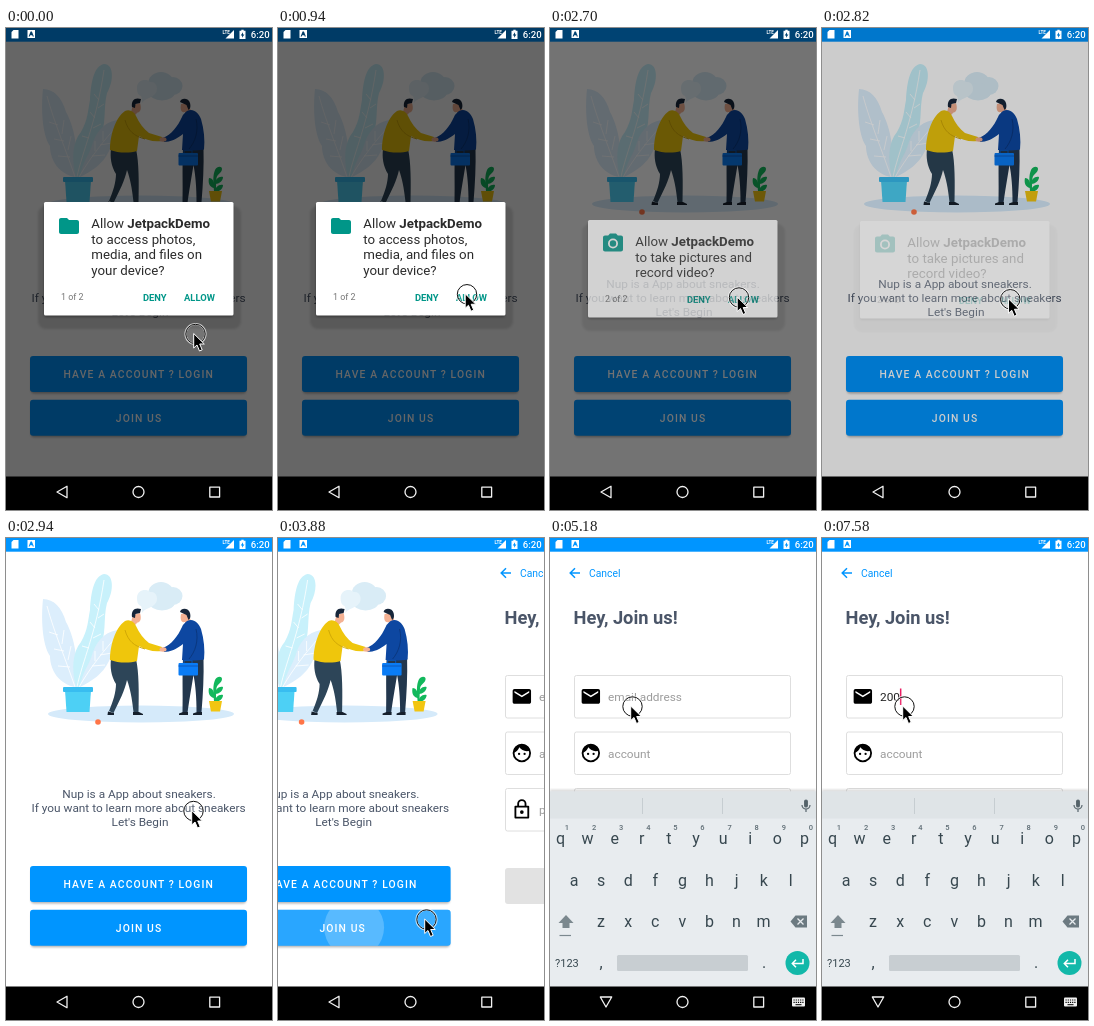
Recreate the animation shown at these times as an HTML page. Size 266 by 482 pixels, loop 8 s.

```html
<!DOCTYPE html>
<html lang="en">
<head>
<meta charset="utf-8">
<title>App sign-up</title>
<style>
  html, body { margin: 0; width: 100%; height: 100%; overflow: hidden; background: #fff; }
  svg { display: block; width: 100vw; height: 100vh; }
  text { font-family: Roboto, sans-serif; white-space: pre; }
  .body { font-size: 11.83px; fill: #4a5568; text-anchor: middle; }
  .btn { font-size: 10.35px; font-weight: 500; letter-spacing: 1.12px; fill: #fff; }
  .msg { font-size: 13.3px; fill: #2b2b2b; }
  .msg .b { font-weight: 700; }
  .act { font-size: 9.4px; font-weight: 600; fill: #009688; }
  .count { font-size: 8.9px; fill: #757575; }
  .hint { font-size: 11.83px; fill: #9c9c9c; }
  .key { font-size: 16px; fill: #37474f; text-anchor: middle; }
  .num { font-size: 7.5px; font-weight: 500; fill: #5f6d75; text-anchor: middle; }
  .field { fill: #fff; stroke: #dedede; }
</style>
</head>
<body>
<svg viewBox="0 0 266 482" preserveAspectRatio="none">
  <defs>
    <filter id="soft" x="-10%" y="-20%" width="120%" height="140%"><feGaussianBlur stdDeviation="1.2"/></filter>
    <clipPath id="joinClip"><rect x="24" y="371.700" width="217" height="36" rx="3"/></clipPath>
  </defs>
  <rect width="266" height="482" fill="#fff"/>

  <g id="welcome">
    <!-- plant -->
    <ellipse cx="135" cy="176" rx="93" ry="8.500" fill="#d5eafa"/>
    <path d="M69 149C53 146 44 132 44 118C36 106 35 80 37 61C48 61 56 70 60 84C69 100 73 126 70 149Z" fill="#dceefc"/>
    <path d="M70 149C65 130 67 113 75 104C82 92 82 82 84 72C85 54 88 38 98 36C108 36 108 53 101 65C97 80 101 98 93 112C89 130 80 142 73 149Z" fill="#c8f1fb"/>
    <path d="M74 149C76 134 84 126 87 114C92 100 102 92 115 92C121 104 107 114 103 123C97 136 86 143 74 149Z" fill="#dceefc"/>
    <g fill="none" stroke="#fff" stroke-width=".8">
      <path d="M69 149C60 122 48 94 41 68M71 149C76 124 90 96 98 42M73 149C84 130 98 112 112 97"/>
      <path d="M52 97l-9-3M58 113l-10-2M64 129l-12-1M56 106l2-14M62 122l3-14M83 110l-7-2M89 90l-5-6M93 72l-5-6M87 100l8-4M92 80l6-4M89 123l0-10M97 113l0-10M86 128l13-1M94 117l12-2"/>
    </g>
    <path d="M59 152H85L83.500 174H60.500Z" fill="#4dd0f5"/>
    <rect x="57" y="149" width="30" height="5" rx="1" fill="#38bdf0"/>
    <!-- speech bubbles -->
    <g fill="#d9ecf6">
      <ellipse cx="155" cy="56" rx="13" ry="12"/>
      <ellipse cx="167" cy="58" rx="9.500" ry="9"/>
      <ellipse cx="156" cy="64" rx="13" ry="8.500"/>
    </g>
    <path d="M131 60C131 52 140 50 144 54C151 53 153 62 149 66C146 70 139 70 136 75C136 72 136 70 135 68C132 67 131 64 131 60Z" fill="#e6f3fa"/>
    <!-- left man -->
    <path d="M105 121H130C133 134 133 155 132.500 174H127.500C126 160 124 150 121 142C119 152 113 164 107.500 175L103 173C107 164 110 154 110 146C105 138 104 129 105 121Z" fill="#2d4558"/>
    <path d="M102 173.500l6 1.500v2h-6.500zM127 174h6l4 2v1h-10z" fill="#16202c"/>
    <path d="M127 77L134 75C135.500 80 135 84 131.500 84.500L129 87L125 84Z" fill="#f4b193"/>
    <path d="M126 79C125 72 129 69 135 71L134 75L129.500 76L129 80Z" fill="#17263a"/>
    <path d="M119 83C123 81 128 83 130 88C133 95 138 101 143 105L156 109L155.500 113C147 114 140 112 133 108L131 123C123 125.500 112 125 104 122C104 108 109 90 119 83Z" fill="#efc60c"/>
    <path d="M119 92C122 103 128 108 139 111" fill="none" stroke="#cda506" stroke-width=".9"/>
    <!-- right man -->
    <path d="M177 120H197.500C198 138 197 156 195.500 174H190.500C190.500 160 189.500 147 187.500 137C185 152 183 164 181.500 175H176.500C177 155 176 137 177 120Z" fill="#23374d"/>
    <path d="M173 175.500l4-1.500h5v3h-9zM187 175.500l4-1.500h5v3h-9z" fill="#16202c"/>
    <path d="M175 76L182 75L185 83L180 87L179 84C175 85 174 81 175 76Z" fill="#f4b193"/>
    <path d="M174 74C175 69 183 70 184 75C185 79 184 81 182.500 82L180.500 77Z" fill="#17263a"/>
    <path d="M181 83C187 80 192 84 195 91C198 101 199 112 198 121.500C190 123 182 122.500 176 122L177 106C171 111 164 114 158 114L157 110C165 107 172 98 176 89C177 86 179 85 181 83Z" fill="#0d47a1"/>
    <path d="M190 91C193 103 189 114 183 121" fill="none" stroke="#0a377f"/>
    <ellipse cx="157" cy="111.500" rx="3.500" ry="2.200" fill="#f4b193"/>
    <path d="M178 125v-2.500h8v2.500" fill="none" stroke="#0a4fa8" stroke-width="1.200"/>
    <rect x="172.500" y="125" width="19.500" height="12.500" rx="1" fill="#0a7cf5"/>
    <path d="M172.500 128h19.500" stroke="#0d57b8"/>
    <!-- small plant -->
    <g fill="#12b85c">
      <path d="M208 163C207 152 207 147 209 142C211 138 216 138 216 141C216 145 211 146 210.500 150C210 155 210 159 210 163Z"/>
      <path d="M208 160C203 159 202 154 203 150C207 150 209 155 208.500 160ZM209.500 156C209 151 213 148 217 149C217 153 213 156 209.500 156ZM209 164C209 159 213 156 217 157C217 161 213 164 209 164Z"/>
    </g>
    <path d="M203 163H216L214 173.500H205Z" fill="#f2c512"/>
    <circle cx="92" cy="184" r="2.800" fill="#ff7547"/>

    <text class="body" x="133" y="259.500">Nup is a App about sneakers.</text>
    <text class="body" x="132.600" y="273.500">If you want to learn more about sneakers</text>
    <text class="body" x="134" y="287.500">Let's Begin</text>
    <g fill="#000" opacity=".3" filter="url(#soft)">
      <rect x="25" y="331" width="215" height="34.500" rx="3"/>
      <rect x="25" y="374.700" width="215" height="34.500" rx="3"/>
    </g>
    <g fill="#0095ff">
      <rect x="24" y="328" width="217" height="36" rx="3"/>
      <rect x="24" y="371.700" width="217" height="36" rx="3"/>
    </g>
    <g id="ripple" fill="#fff" clip-path="url(#joinClip)">
      <rect x="24" y="371" width="217" height="37" opacity=".16"/>
      <circle cx="144.500" cy="389.500" r="30" opacity=".22"/>
    </g>
    <text class="btn" x="57.500" y="350.200">HAVE A ACCOUNT ? LOGIN</text>
    <text class="btn" x="109.800" y="393.700">JOIN US</text>
  </g>

  <g id="join">
    <rect y="14" width="266" height="435" fill="#fff"/>
    <path d="M30 35H20.500M25 30.200L20.200 35L25 39.800" fill="none" stroke="#0095ff" stroke-width="1.500"/>
    <text x="39" y="38.700" font-size="10.35" fill="#0095ff">Cancel</text>
    <text x="23.500" y="85.500" font-size="18.3" font-weight="700" fill="#4a5568">Hey, Join us!</text>
    <rect class="field" x="24.500" y="137.500" width="216" height="42.500" rx="2"/>
    <rect class="field" x="24.500" y="194" width="216" height="42.500" rx="2"/>
    <rect class="field" x="24.500" y="250.500" width="216" height="42.500" rx="2"/>
    <path transform="translate(29.800 147.400) scale(.92)" d="M20 4H4c-1.100 0-2 .9-2 2v12c0 1.100.9 2 2 2h16c1.100 0 2-.9 2-2V6c0-1.100-.9-2-2-2zm0 4l-8 5-8-5V6l8 5 8-5v2z"/>
    <g transform="translate(29.800 204) scale(.92)">
      <circle cx="12" cy="12" r="9" fill="none" stroke="#000" stroke-width="2"/>
      <path d="M3 12C6 11 8.300 8.600 9.300 5.800C11 8.300 14 10 17.400 10L20.500 9.500C20 5 16 2.500 12 2.500S3 6 3 12Z"/>
      <circle cx="9" cy="13" r="1.250"/><circle cx="15" cy="13" r="1.250"/>
    </g>
    <g transform="translate(29.800 260.300) scale(.92)">
      <path d="M5 9H19V21H5ZM8 9V6a4 4 0 0 1 8 0V9" fill="none" stroke="#000" stroke-width="2" stroke-linejoin="round"/>
      <circle cx="12" cy="15" r="2"/>
    </g>
    <text class="hint" id="hint" x="58" y="163">email address</text>
    <text class="hint" x="58" y="219.600">account</text>
    <text class="hint" x="58" y="276.200">password</text>
    <text id="typed" x="58" y="163" font-size="11.83" fill="#222"></text>
    <rect id="caret" y="150.500" width="1.500" height="16.500" fill="#e91e63"/>
    <rect x="24" y="330" width="217" height="36" rx="3" fill="#e2e2e2"/>
  </g>

  <g id="keyboard">
    <rect y="251.500" width="266" height="4" fill="#000" opacity=".14" filter="url(#soft)"/>
    <rect y="253.500" width="266" height="196" fill="#e8ecef"/>
    <rect y="253.500" width="266" height="27" fill="#dfe4e7"/>
    <path d="M92.500 260V276M172.500 260V276" stroke="#c6cdd1"/>
    <g fill="none" stroke="#55636a" stroke-width="1.200">
      <path d="M252 267a4 4 0 0 0 8 0M256 271v3"/>
      <rect x="254.700" y="262" width="2.600" height="7" rx="1.300" fill="#55636a"/>
    </g>
    <g id="keys"></g>
    <path d="M16 377L23.500 385H19.500V390H12.500V385H8.500Z" fill="#7b888e"/>
    <path d="M9.500 397.500H21" stroke="#7b888e" stroke-width="1.200"/>
    <path d="M245.500 377.500H257V389.500H245.500L240.500 383.500Z" fill="#6c7a81"/>
    <path d="M247.500 380.500l6 6m0-6l-6 6" stroke="#e8ecef" stroke-width="1.300"/>
    <text x="5" y="428.700" font-size="11" fill="#37474f">?123</text>
    <rect x="67" y="417" width="131" height="16" rx="1.500" fill="#c8ced2"/>
    <circle cx="247.500" cy="425" r="12" fill="#12b8a9"/>
    <path d="M253 421V425.500H242.500M246 421.800L242.300 425.500L246 429.200" fill="none" stroke="#fff" stroke-width="1.500"/>
  </g>

  <rect width="266" height="13.700" fill="#0095ff"/>
  <rect id="scrim" width="266" height="449"/>

  <g id="dialog">
    <rect id="shade" x="32" width="203" rx="8" opacity=".12" filter="url(#soft)"/>
    <rect id="shade2" x="38" width="189" rx="2" opacity=".35" filter="url(#soft)"/>
    <rect id="card" x="38" width="189.500" rx="1.500" fill="#fff"/>
    <rect id="press" x="173" y="257" width="41" height="24" rx="1.500" fill="#e6e6e6"/>
    <g id="ask1">
      <path transform="translate(51 186)" fill="#009688" d="M10 4H4c-1.100 0-2 .9-2 2v12c0 1.100.9 2 2 2h16c1.100 0 2-.9 2-2V8c0-1.100-.9-2-2-2h-8l-2-2z"/>
      <text class="msg" x="85.300" y="200">Allow <tspan class="b">JetpackDemo</tspan></text>
      <text class="msg" x="85.300" y="215.600">to access photos,</text>
      <text class="msg" x="85.300" y="231.200">media, and files on</text>
      <text class="msg" x="85.300" y="246.800">your device?</text>
    </g>
    <g id="ask2">
      <path transform="translate(51 201.500)" fill="#009688" fill-rule="evenodd" d="M9 2L7.200 4H4c-1.100 0-2 .9-2 2v12c0 1.100.9 2 2 2h16c1.100 0 2-.9 2-2V6c0-1.100-.9-2-2-2h-3.200L15 2H9zM12 7a5 5 0 1 1 0 10a5 5 0 1 1 0-10zM12 8.800a3.200 3.200 0 1 0 0 6.400a3.200 3.200 0 1 0 0-6.400z"/>
      <text class="msg" x="85.300" y="216">Allow <tspan class="b">JetpackDemo</tspan></text>
      <text class="msg" x="85.300" y="231.700">to take pictures and</text>
      <text class="msg" x="85.300" y="247.400">record video?</text>
    </g>
    <text class="count" id="count" x="55" y="272.300"></text>
    <text class="act" x="137" y="272.500">DENY</text>
    <text class="act" x="178" y="272.500">ALLOW</text>
  </g>

  <!-- status bar icons -->
  <g fill="#fff">
    <path d="M7.500 2H12.500V10.500H5.500V4Z"/>
    <path fill-rule="evenodd" d="M21.500 2h7.500v8h-7.500zM24.600 3.500h1.300l2 5h-1.200l-.4-1.200h-2.100l-.4 1.200h-1.200z"/>
    <text x="216.500" y="5.800" font-size="4.6" font-weight="700">LTE</text>
    <path d="M219.500 10.500H228V2Z"/>
    <path fill-rule="evenodd" d="M233.500 2.800h1.800V1.800h2.400v1h1.800V11h-6zM237 4.200l-2.300 3.200h1.400V9.800l2.300-3.400H237z"/>
    <text x="244.800" y="9.800" font-size="9.6" font-weight="500">6:20</text>
  </g>

  <!-- navigation bar -->
  <rect y="448.500" width="266" height="33.500"/>
  <g fill="none" stroke="#f2f2f2" stroke-width="1.300" stroke-linejoin="round">
    <path id="back" d="M51 464L61 458.300V469.700Z"/>
    <circle cx="132.500" cy="464" r="5.500"/>
    <rect x="203.800" y="459.200" width="9.800" height="9.800"/>
  </g>
  <g id="ime">
    <rect x="242" y="459.500" width="13" height="9" rx="1" fill="#f2f2f2"/>
    <path d="M243.500 462H253.500M243.500 464.300H253.500" stroke="#000" stroke-width="1.200" stroke-dasharray="1.200 1"/>
    <path d="M245.500 466.700H251.500" stroke="#000"/>
  </g>

  <g id="pointer">
    <circle r="10" fill="#fff" fill-opacity=".1" stroke="#fff" stroke-width="2.200" stroke-opacity=".7"/>
    <circle r="9.700" fill="none" stroke="#111"/>
    <path d="M-1.800 -.5V14L1.500 11L4 17L6.700 15.800L4.200 10H8.800Z" stroke="#fff"/>
  </g>
</svg>
<script>
const $ = id => document.getElementById(id);
const set = (id, attrs) => {
  for (const name in attrs) $(id).setAttribute(name, attrs[name]);
};
const show = (id, on) => { $(id).style.display = on ? '' : 'none'; };
const shift = (id, x, y) => set(id, { transform: `translate(${x} ${y})` });

const row = (chars, x, y, cls = 'key') => [...chars].map((c, i) =>
  `<text class="${cls}" x="${x + i * 27.1}" y="${y}">${c}</text>`).join('');
$('keys').innerHTML = row('qwertyuiop', 10.5, 305.5) + row('1234567890', 17, 292, 'num') +
  row('asdfghjkl', 24, 347.5) + row('zxcvbnm', 51, 388.5) +
  row(',', 51, 430) + row('.', 214, 430);

// Tables of [tick, ...values]; values run linearly between rows.
const pointer = [[0, 189.5, 306], [5, 189.5, 272.5], [7, 189.5, 272.5], [9, 188.5, 260],
  [17, 188.5, 260], [19, 189, 269.5], [23, 189, 269.5], [25, 187.5, 273], [29, 149.5, 377],
  [30, 148.5, 381.5], [34, 148.5, 381.5], [38, 82.5, 168.5]];
const slide = [[32, 0, 272], [33, -68.4, 203], [34, -150, 119], [35, -215, 52], [36, -252, 14], [37, -266, 0]];
const rise = [[39, 196], [40, 120], [41, 36], [42, 0]];
const cardTop = [[12, 174], [13, 182], [14, 190]];
const fade = [[22, 1, .6, 0], [23, .68, .55, 2], [24, .2, .2, 3], [25, 0, 0, 3]];
const askIn = [[15, 0], [16, .3], [17, .75], [18, 1]];
const pressed = [[11, 0], [12, .6], [13, 1], [15, 1], [18, 0]];
// Hard changes: [tick, typed text, caret visible]
const typing = [[0, '', 0], [40, '', 1], [44, '', 0], [49, '', 1], [53, '2', 1], [57, '2', 0],
  [61, '2', 1], [62, '20', 1], [64, '200', 1]];

function at(table, k) {
  const i = table.findIndex(r => r[0] > k);
  if (i === 0) return table[0].slice(1);
  if (i < 0) return table[table.length - 1].slice(1);
  const a = table[i - 1], b = table[i], p = (k - a[0]) / (b[0] - a[0]);
  return a.slice(1).map((v, j) => v + (b[j + 1] - v) * p);
}

const tick = t => t < 5180 ? Math.min(43, Math.floor((t + 8) / 117.65)) : 44 + Math.floor((t - 5180) / 120);

function draw(t) {
  const k = tick(t);
  shift('pointer', ...at(pointer, k));

  const [oldX, newX] = at(slide, k);
  shift('welcome', oldX, 0);
  shift('join', newX, 0);
  show('welcome', k < 37);
  show('join', k > 32);
  show('ripple', k > 32);

  const [top] = at(cardTop, k), [alpha, dim, drop] = at(fade, k);
  set('scrim', { opacity: dim });
  set('dialog', { opacity: alpha });
  shift('dialog', 0, drop);
  show('dialog', alpha > 0);
  set('card', { y: top, height: 287.5 - top });
  set('shade', { y: top + 4, height: 297 - top });
  set('shade2', { y: top + 2, height: 287 - top });
  set('press', { opacity: at(pressed, k) });
  set('ask2', { opacity: at(askIn, k) });
  show('ask1', k < 13);
  $('count').textContent = k < 13 ? '1 of 2' : '2 of 2';

  const [lift] = at(rise, k);
  shift('keyboard', 0, lift);
  show('keyboard', k > 39);
  show('ime', k > 39);
  set('back', { transform: k > 39 ? 'rotate(-90 56 464)' : '' });

  const [, text, caret] = typing.filter(r => r[0] <= k).pop();
  $('typed').textContent = text;
  show('hint', !text);
  show('caret', caret);
  set('caret', { x: 58 + text.length * 6.64 });
}

const start = performance.now();
function loop() {
  draw((performance.now() - start) % 8000);
  requestAnimationFrame(loop);
}
loop();
</script>
</body>
</html>
```
